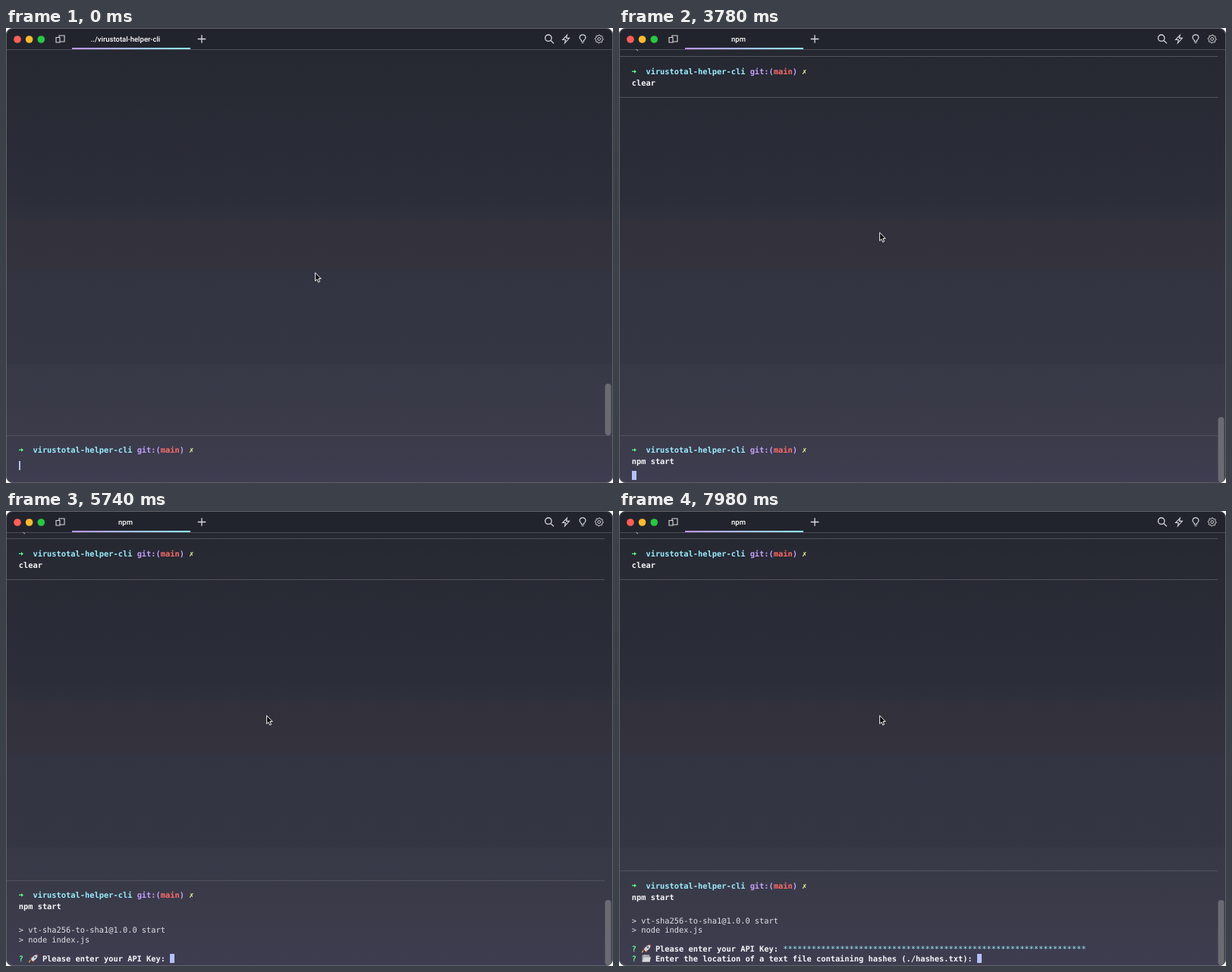
Recreate the animation shown at these times as an HTML page with a canvas. Size 800 by 600 pixels, loop 8000 ms.

```html
<!DOCTYPE html>
<html lang="en">
<head>
<meta charset="utf-8">
<title>Terminal session</title>
<style>
html, body { margin: 0; width: 100%; height: 100%; overflow: hidden; background: #fff; }
canvas { display: block; width: 800px; height: 600px; }
</style>
</head>
<body>
<canvas id="stage" width="800" height="600"></canvas>
<script>
const ctx = document.getElementById('stage').getContext('2d');
const LOOP = 8000, STEP = 70, CELL = 6.237, LEFT = 16.7;
const MONO = '10.36px "DejaVu Sans Mono", monospace';
const C = {
  green: '#5af78e', cyan: '#9aedfe', purple: '#c6a0fb', red: '#ff6b67', yellow: '#f4f99d',
  white: '#f5f5f8', plain: '#e2e2e8', ghost: '#888997', caret: '#b4c1fa', line: '#51525e'
};

// [time, x, y] of the pointer tip
const POINTER = [[840, 407, 322], [1120, 348, 367], [1260, 336, 346], [1540, 336, 325],
                 [1890, 336, 325], [2380, 343, 269]];
// times at which each letter of the command is typed
const COMMAND = 'npm start';
const KEYS = [2380, 2520, 2590, 2660, 2870, 3080, 3220, 3360, 3500];
const T = { run: 3780, output: 5040, ask: 5320, paste: 7000, redraw: 7140, pasted: 7210, next: 7420 };

const shell = ctx.createLinearGradient(0, 0, 0, 600);
[[0, '#24262f'], [60, '#272933'], [145, '#292b36'], [222, '#2b2e39'], [252, '#2e313c'],
 [253, '#31303b'], [319, '#33323d'], [321, '#323442'], [443, '#343643'], [445, '#383946'],
 [487, '#393a48'], [540, '#3b3b4a'], [600, '#3e3d51']]
  .forEach(([y, color]) => shell.addColorStop(y / 600, color));
const underline = ctx.createLinearGradient(87, 0, 243, 0);
underline.addColorStop(0, '#bd93f9');
underline.addColorStop(1, '#8be9fd');

function text(str, col, y, color, bold) {
  ctx.font = (bold ? 'bold ' : '') + MONO;
  ctx.fillStyle = color;
  ctx.fillText(str, LEFT + col * CELL, y);
}

function rect(x, y, w, h, color) {
  ctx.fillStyle = color;
  ctx.fillRect(x, y, w, h);
}

function disc(x, y, r, color) {
  ctx.fillStyle = color;
  ctx.beginPath();
  ctx.arc(x, y, r, 0, 7);
  ctx.fill();
}

function shape(d, x, y, fill, stroke, width = 1) {
  const p = new Path2D(d);
  ctx.save();
  ctx.translate(x, y);
  if (fill) { ctx.fillStyle = fill; ctx.fill(p); }
  if (stroke) { ctx.strokeStyle = stroke; ctx.lineWidth = width; ctx.stroke(p); }
  ctx.restore();
}

function scrollbar(y, h) {
  ctx.fillStyle = '#6a6b72';
  ctx.beginPath();
  ctx.roundRect(789.5, y, 8, h, 4);
  ctx.fill();
}

function rule(y, right = 789) { rect(1, y, right - 1, 1, C.line); }
function block(col, y) { rect(Math.round(LEFT + col * CELL), y - 10, 6, 12, C.caret); }

function prompt(y) {
  shape('M0 -0.6H3V-2.4L6 0L3 2.4V0.6H0Z', 17, y - 3.6, C.green);
  text('virustotal-helper-cli', 3, y, C.cyan, true);
  text('git:(', 25, y, C.purple, true);
  text('main', 30, y, C.red, true);
  text(')', 34, y, C.purple, true);
  text('✗', 36, y, C.yellow, true);
}

function rocket(x, y) {
  shape('M0 -1L3 -4L2 -1L0 1Z', x, y, '#f6a623');
  shape('M2 -6L6 -7L4 -3Z M6 0L9 -4L5 -1Z', x, y, '#d8453e');
  shape('M3 -4Q7 -11 12 -10Q12 -5 5 -1Z', x, y, '#d5d8df');
  shape('M10 -10L12 -10L12 -7.6Z', x, y, '#d8453e');
  disc(x + 8, y - 6.5, 1.3, '#46657f');
}

function folder(x, y) {
  shape('M0.5 0V-9H4.5L5.5 -7.8H11V0Z', x, y, '#9da0a6');
  shape('M0.5 0L2.5 -6H12L10.5 0Z', x, y, '#d4d6da');
  shape('M3 -8.5H10', x, y, null, '#efeff1');
}

function header(title) {
  rect(1, 1, 798, 27, '#22242d');
  rect(1, 28, 798, 1, '#4c4d56');
  rect(87, 26, 156, 2, underline);
  disc(15, 15, 4.8, '#ff5f57');
  disc(30.6, 15, 4.8, '#febc2e');
  disc(46.3, 15, 4.8, '#28c840');
  ctx.font = '500 9.5px Roboto, sans-serif';
  ctx.fillStyle = '#fff';
  ctx.textAlign = 'center';
  ctx.fillText(title, 157.5, 18);
  ctx.textAlign = 'left';
  const ink = '#d9dade';
  shape('M0 2.5H5V9H0ZM5 8H11V0H4V2.5', 66, 10, null, ink, 1.1);
  shape('M-5.3 0H5.3M0 -5.3V5.3', 258, 14.5, null, ink, 1.3);
  shape('M4.2 0A4.2 4.2 0 1 1 -4.2 0A4.2 4.2 0 1 1 4.2 0M3 3L7.2 7.2', 714.8, 13.2, null, ink, 1.3);
  shape('M1.4 -5.2L-4.4 1H-0.6L-1.6 5.3L4.4 -1.1H0.5Z', 738, 14.5, null, ink, 1.1);
  shape('M-1.7 3.2V1.8C-5.6 -1 -4 -5.4 0 -5.4C4 -5.4 5.6 -1 1.7 1.8V3.2ZM-1.5 5.2H1.5', 760, 14.3, null, ink, 1.1);
  let gear = '';
  for (let i = 0; i < 32; i++) {
    const a = i / 32 * Math.PI * 2, r = i % 4 < 2 ? 5.5 : 4.3;
    gear += (i ? 'L' : 'M') + r * Math.cos(a) + ' ' + r * Math.sin(a);
  }
  shape(gear + 'ZM1.9 0A1.9 1.9 0 1 1 -1.9 0A1.9 1.9 0 1 1 1.9 0', 781.7, 14.5, null, ink, 1);
}

function pointer(t) {
  let [, x, y] = POINTER[0];
  for (let i = 1; i < POINTER.length; i++) {
    const [t0, x0, y0] = POINTER[i - 1], [t1, x1, y1] = POINTER[i];
    if (t < t0) break;
    const k = Math.min(1, (t - t0) / (t1 - t0)), e = k * k * (3 - 2 * k);
    x = x0 + (x1 - x0) * e;
    y = y0 + (y1 - y0) * e;
  }
  shape('M0.6 0.7V11.6L3 9.4L4.7 13.3L6.6 12.5L4.9 8.6H8.2Z', x, y, '#0b0b0e', '#f4f4f6', 1);
}

function editor(t) {
  rule(537, 799);
  prompt(560);
  const n = KEYS.filter(k => t >= k).length;
  if (n) {
    text(COMMAND.slice(0, Math.min(n, 3)), 0, 580, C.green);
    if (n > 4) text(COMMAND.slice(4, n), 4, 580, C.white);
    text(COMMAND.slice(n), n, 580, C.ghost);
  }
  rect(Math.round(LEFT + n * CELL), 571, 2, 12, C.caret);
  scrollbar(469, 68);
}

function session(t) {
  const out = t >= T.output, next = t >= T.next;
  const lift = out ? 1 : 0;
  shape('M0 0L2.5 1.8', 22.5, 28.2, null, '#c5c6cc');
  rule(37 - lift);
  prompt(61 - lift);
  text('clear', 0, 75.5 - lift, C.white, true);
  rule(91 - lift);

  const y = next ? 497.5 : out ? 510 : 560;
  rule(next ? 474 : out ? 487 : 537);
  prompt(y);
  text(COMMAND, 0, y + 15, C.white, true);
  if (out) {
    text('> vt-sha256-to-sha1@1.0.0 start', 0, y + 46, C.plain);
    text('> node index.js', 0, y + 58.5, C.plain);
  }
  const redraw = t >= T.redraw && t < T.pasted;
  if (t < T.ask || redraw) {
    block(0, 594);
  } else {
    const row = next ? 581 : 594;
    const stars = t >= T.pasted ? 64 : t >= T.paste ? 16 * (1 + (t - T.paste) / STEP) : 0;
    text('?', 0, row, C.green, true);
    rocket(30, row + 1);
    text('Please enter your API Key:', 5, row, C.white, true);
    text('*'.repeat(stars), 32, row, C.cyan);
    if (next) {
      text('?', 0, 594, C.green, true);
      folder(30, 594.5);
      text('Enter the location of a text file containing hashes (./hashes.txt):', 5, 594, C.white, true);
      block(73, 594);
    } else {
      block(32 + stars, 594);
    }
  }
  scrollbar(513, 86);
}

function draw(t) {
  ctx.textRendering = 'geometricPrecision';
  ctx.clearRect(0, 0, 800, 600);
  ctx.save();
  ctx.beginPath();
  ctx.roundRect(0, 0, 800, 600, 9);
  ctx.clip();
  rect(0, 0, 800, 600, shell);
  const running = t >= T.run;
  header(running ? 'npm' : '../virustotal-helper-cli');
  running ? session(t) : editor(t);
  pointer(t);
  ctx.restore();
  ctx.strokeStyle = '#62636b';
  ctx.lineWidth = 1;
  ctx.beginPath();
  ctx.roundRect(0.5, 0.5, 799, 599, 8.5);
  ctx.stroke();
}

const start = performance.now();
function tick() {
  const t = (performance.now() - start) % LOOP;
  draw(Math.floor(t / STEP) * STEP);
  requestAnimationFrame(tick);
}
tick();
</script>
</body>
</html>
```
